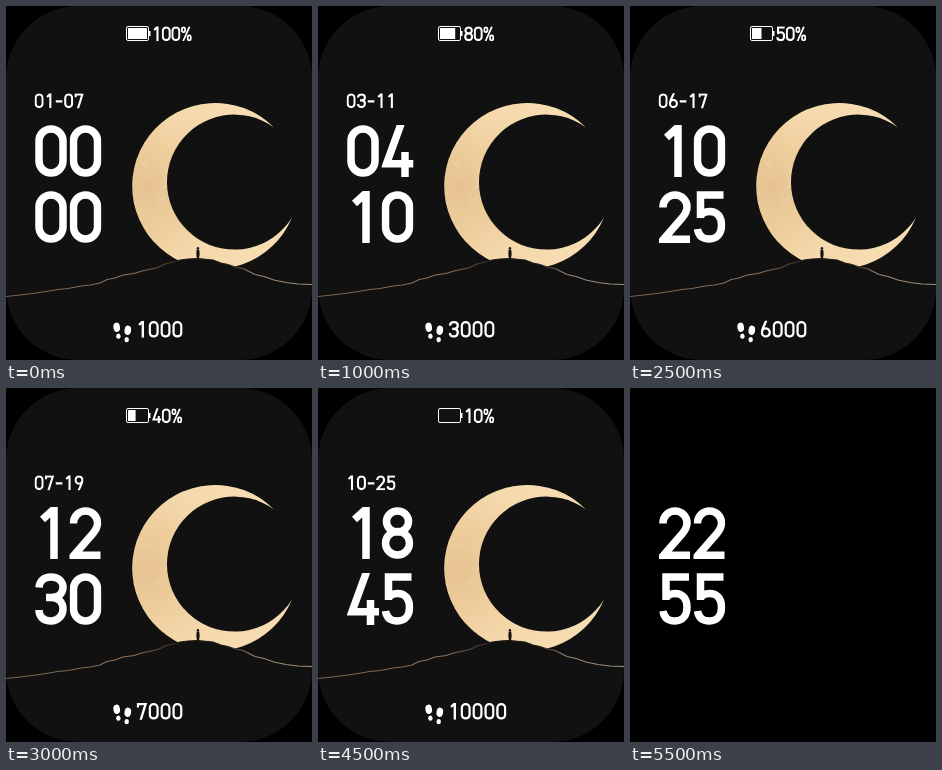
Animation of 306x354 px, one loop 6000 ms. Source, as an HTML page:

```html
<!DOCTYPE html>
<html lang="en">
<head>
<meta charset="utf-8">
<title>Moon watch face</title>
<style>
  html, body { margin: 0; width: 100%; height: 100%; overflow: hidden; background: #000; }
  svg { display: block; }
  #stage { width: 306px; height: 354px; }
  .glyphs { fill: none; stroke: #fff; stroke-width: 7.5; }
  .small { stroke-width: 7.2; }
</style>
</head>
<body>
<svg id="stage" viewBox="0 0 306 354">
  <defs>
    <radialGradient id="gold" gradientUnits="userSpaceOnUse" cx="138" cy="182" r="120">
      <stop offset="0" stop-color="#e6c291"/>
      <stop offset=".3" stop-color="#edcb9a"/>
      <stop offset=".65" stop-color="#f4d8aa"/>
      <stop offset="1" stop-color="#f6dcb0"/>
    </radialGradient>
    <linearGradient id="rim" gradientUnits="userSpaceOnUse" x1="0" y1="0" x2="306" y2="0">
      <stop offset="0" stop-color="#75614f"/>
      <stop offset=".42" stop-color="#8c7259"/>
      <stop offset=".53" stop-color="#4a3a2a"/>
      <stop offset=".58" stop-color="#191512"/>
      <stop offset=".72" stop-color="#241d17"/>
      <stop offset=".8" stop-color="#927d68"/>
      <stop offset="1" stop-color="#a39383"/>
    </linearGradient>
    <filter id="mottle" x="0" y="0" width="1" height="1">
      <feTurbulence type="fractalNoise" baseFrequency=".09" numOctaves="4" seed="4"/>
      <feColorMatrix values="0 0 0 0 .86  0 0 0 0 .7  0 0 0 0 .48  7 0 0 0 -4"/>
      <feComposite in2="SourceGraphic" operator="in"/>
    </filter>
    <path id="moon" d="M268 121.400A83 83 0 1 0 286 211.400A67.500 67.500 0 1 1 268 121.400z"/>
  </defs>

  <g id="face">
    <rect width="306" height="354" rx="72" fill="#111"/>
    <use href="#moon" fill="url(#gold)"/>
    <use href="#moon" filter="url(#mottle)" opacity=".25"/>
    <path d="M0 290.500L14 289L30 287L40 285.500L52 283.500L62 282.500L75 280L84 279L94 277L101 273.500L109 272L117 269L128 267.500L136 265L145 263L152 261.500L159 258L167 256L174 254L182 253L192 252.500L207 254L215 257L222 258.500L231 261.500L237 262.500L243 265.500L249 268.500L258 270.500L268 274L280 276.500L292 278L306 278.500" fill="#111" stroke="url(#rim)" stroke-width="1.200"/>
    <g fill="#15100d">
      <circle cx="191.900" cy="242.300" r="1.200"/>
      <path d="M190.700 243.500h2.500l.5 4.500l-.8 5h-1.900l-.7-5z"/>
    </g>

    <rect x="120.500" y="20.500" width="22" height="14" rx="1.500" fill="none" stroke="#fff"/>
    <path d="M143 25h1.500v5h-1.500z" fill="#fff"/>
    <rect id="charge" x="122" y="22" height="11" rx=".5" fill="#fff"/>

    <g fill="#fff">
      <ellipse cx="110.700" cy="321.300" rx="3.300" ry="4.700" transform="rotate(-8 110.700 321.300)"/>
      <ellipse cx="112.400" cy="330.200" rx="2.200" ry="2.600"/>
      <ellipse cx="121.800" cy="324.300" rx="3.300" ry="4.700" transform="rotate(8 121.800 324.300)"/>
      <ellipse cx="120.700" cy="333.700" rx="2.200" ry="2.600"/>
    </g>
    <g id="battery" class="glyphs small" role="img"/>
    <g id="date" class="glyphs small" role="img"/>
    <g id="steps" class="glyphs small" role="img"/>
  </g>
  <g id="hour" class="glyphs" role="img"/>
  <g id="minute" class="glyphs" role="img"/>
</svg>

<script>
const $ = id => document.getElementById(id);
const STEP = 500, COUNT = 12, AWAKE = 10;

// Numeral centrelines on a cell 52 units tall
const GLYPHS = {
  0: 'M4 16a12 12 0 0 1 24 0V36a12 12 0 0 1-24 0z',
  1: 'M19 52V0M7.500 12.500L19 2',
  2: 'M4 16.500V16a12 12 0 0 1 24 0c0 4.500-2 7.500-5 11L4.500 48.200H31',
  3: 'M4 14.500C4.500 8 9 4 16 4c7.500 0 12 4.500 12 10.500S23 24.500 16 24.500H11M16 24.500c8 0 12 5 12 11.500S23 48 16 48C9 48 4 44 4 37',
  4: 'M19.500-1L5 38.700H32M23.500 27V52',
  5: 'M30 4H7V27M6.500 25.500C8.500 21.800 12 20.500 16 20.500c8 0 12 5.500 12 13.700S23.500 48 16 48C9 48 5 44.500 4 38',
  6: 'M4 35.500a12 12.500 0 1 0 24 0a12 12.500 0 1 0-24 0c0-6 2-10 4-15L18-2',
  7: 'M4 14V4H27.500L12 54',
  8: 'M5 14.500a11 10.500 0 1 0 22 0a11 10.500 0 1 0-22 0M4 36.200a12 11.800 0 1 0 24 0a12 11.800 0 1 0-24 0',
  9: 'M28 16.500a12 12.500 0 1 0-24 0a12 12.500 0 1 0 24 0c0 6-2 10-4 15L14 54',
  '-': 'M2 28H25',
  '%': 'M3.500 10a5.500 6.500 0 0 1 11 0v4a5.500 6.500 0 0 1-11 0zM23.500 38a5.500 6.500 0 0 1 11 0v4a5.500 6.500 0 0 1-11 0zM30 1L8 51'
};
const WIDTHS = { '-': 27, '%': 38 };

function write(id, text, x, y, height, gap) {
  const k = height / 52;
  let out = '';
  for (const c of text) {
    const w = WIDTHS[c] || 32;
    const thin = c === '%' ? ' stroke-width="6"' : '';
    out += `<svg x="${x}" y="${y}" width="${w * k}" height="${height}" viewBox="0 0 ${w} 52">` +
           `<path d="${GLYPHS[c]}"${thin}/></svg>`;
    x += w * k + gap;
  }
  $(id).innerHTML = out;
  $(id).setAttribute('aria-label', text);
}

const pad = n => String(n).padStart(2, '0');

function show(i) {
  write('hour', pad(i * 2), 29, 119, 52, 2.5);
  write('minute', pad(i * 5), 29, 185, 52, 2.5);
  const awake = i < AWAKE;
  $('face').style.display = awake ? '' : 'none';
  if (!awake) return;
  const level = 100 - i * 10;
  write('battery', level + '%', 146, 20.3, 15, 0.4);
  write('date', pad(i + 1) + '-' + pad(7 + i * 2), 28.5, 87.3, 15, 1.1);
  write('steps', String((i + 1) * 1000), 130.6, 314.8, 17, 1.4);
  $('charge').setAttribute('width', level > 10 ? level * 0.19 : 0);
}

let last = -1;
function tick() {
  const i = Math.floor(performance.now() / STEP) % COUNT;
  if (i !== last) show(last = i);
  requestAnimationFrame(tick);
}
tick();
</script>
</body>
</html>
```
